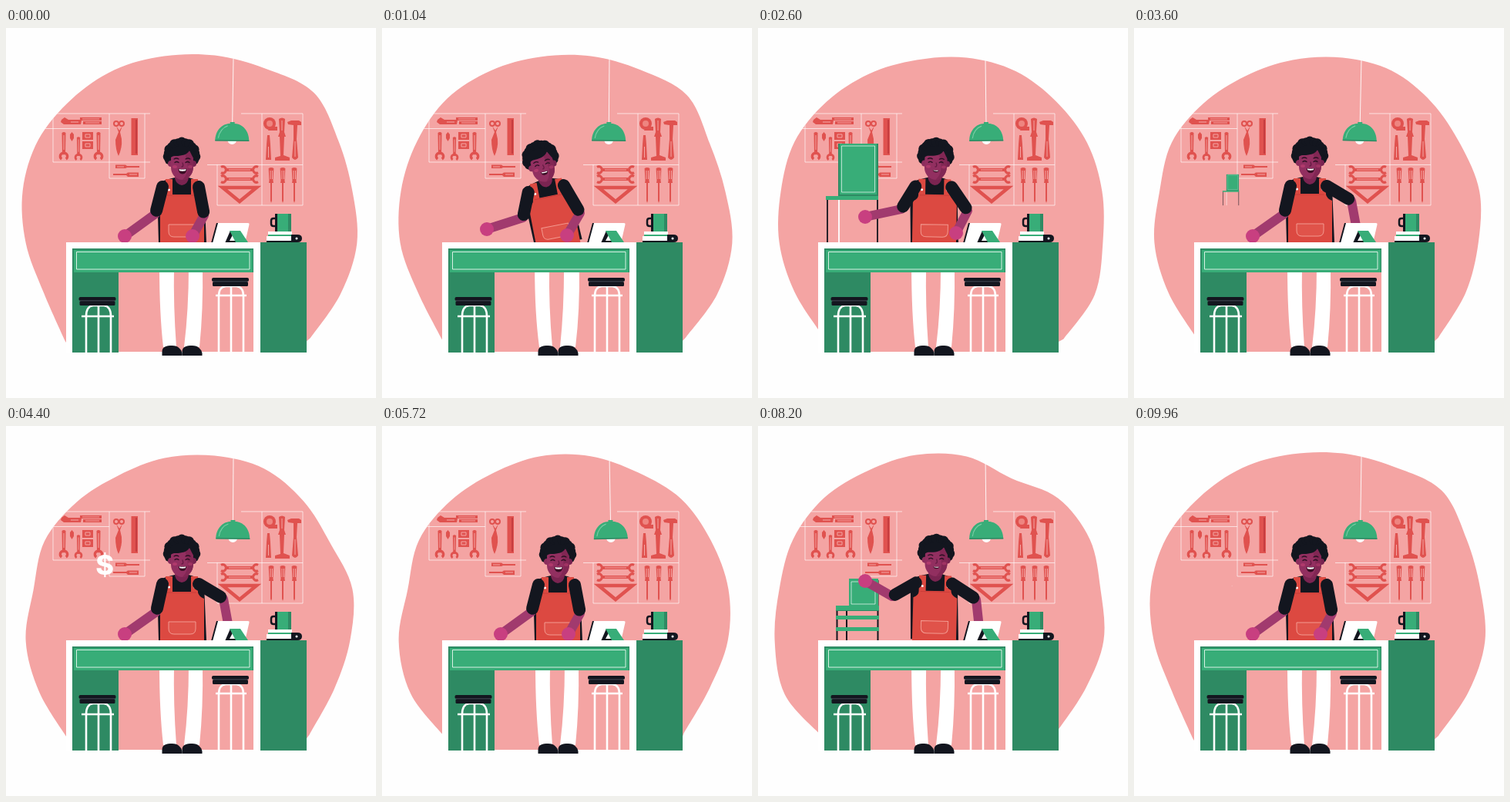
These frames come from a looping animation (480 px wide and 480 px high, 10 s). An HTML page:

```html
<!DOCTYPE html>
<html lang="en">
<head>
<meta charset="utf-8">
<title>Workshop</title>
<style>
  html, body { margin: 0; width: 100%; height: 100%; overflow: hidden; background: #fefefe; }
  svg { display: block; width: 100vw; height: 100vh; }
  .line { fill: none; stroke: #fff; stroke-width: 1; stroke-opacity: .65; }
  .tool { fill: #e0524f; }
  .toolLine { fill: none; stroke: #e0524f; }
  .glint { fill: none; stroke: #f4a5a4; stroke-width: 1; }
  .dark { fill: #13161f; }
  .green { fill: #38ad78; }
  .deep { fill: #2e8a63; }
  .white { fill: #fff; }
  .limb { fill: none; stroke-linecap: round; stroke-linejoin: round; }
  .sleeve { stroke: #13161f; stroke-width: 16; }
  .skin { stroke: #a13a6e; stroke-width: 12; }
  .hand { fill: #c83f80; }
  #cash { font: 800 36px Inter, "Open Sans", sans-serif; text-anchor: middle; fill: #fff; }
</style>
</head>
<body>
<svg viewBox="0 0 480 480">
  <defs>
    <clipPath id="inside"><path id="blobClip"/></clipPath>
    <clipPath id="aboveDesk"><path d="M0 0H480V279H0Z"/></clipPath>
    <g id="wrench">
      <path class="tool" d="M-2.5 0Q0 -2 2.5 0L2 26H-2Z"/>
      <path class="toolLine" stroke-width="3.4" d="M-2.8 34A4.3 4.3 0 0 1 -2 26.5H2A4.3 4.3 0 0 1 2.8 34"/>
      <path class="glint" d="M0 3V22"/>
    </g>
    <g id="driver">
      <path class="tool" d="M-3.4 1Q0 -1 3.4 1L2.5 17L3 20H-3L-2.5 17ZM-1 20H1V43L0 46L-1 43Z"/>
      <path class="glint" d="M-1 4V15M1.5 4V15"/>
    </g>
    <g id="spanner">
      <path class="toolLine" stroke-width="4" d="M8 0H42"/>
      <path class="toolLine" stroke-width="3" d="M1 -3.6A4.2 4.2 0 1 1 1 3.6M49 -3.6A4.2 4.2 0 1 0 49 3.6"/>
      <path class="glint" d="M11 0H39"/>
    </g>
    <g id="seat">
      <rect class="dark" x="-24" width="48" height="5" rx="2"/>
      <rect class="dark" x="-23" y="5" width="46" height="6" rx="1.5"/>
      <path d="M-23 4.8H23" stroke="#59606b" stroke-width=".7"/>
    </g>
    <path id="shoe" class="dark" d="M0 425V420C0 413 6 412 13 412C21 412 25 417 26 422V425Z"/>
  </defs>

  <path id="blob" fill="#f4a4a3"/>

  <g clip-path="url(#inside)">
    <path class="line" d="M60 111H187M61 111V174H187M48 130.500H134M134 111V195H180V111M305 111H385V230H274V177M261 177.500H385M332 111V230"/>
    <path class="tool" d="M72 119L76 116L81 119H96V116H124V120H98L97 125H75L71 122ZM100 121H124V125H100Z"/>
    <path class="glint" d="M99 118H121M84 122H94M103 123H121"/>
    <use href="#wrench" x="75" y="136"/>
    <use href="#wrench" x="120" y="136"/>
    <use href="#wrench" transform="translate(94 142) scale(.85)"/>
    <path class="tool" d="M83 138L85.500 135L88 138V143L85.500 147L83 143ZM99 135H113V145H99ZM99 147H113V157H99Z"/>
    <path class="glint" d="M103 138H109V142H103ZM103 150H109V154H103Z"/>
    <g class="toolLine" stroke-width="2"><circle cx="143" cy="124" r="3"/><circle cx="150" cy="124" r="3"/></g>
    <path class="tool" d="M143 127L146 135L142 145Q142 158 146 166Q151 155 150 144L148 135L151 127L147 133Z"/>
    <rect class="tool" x="162.500" y="117" width="8.500" height="48"/>
    <path d="M169 119V163" stroke="#c63d40" stroke-width="2"/>
    <path class="tool" d="M142 177.500H155L157 179H173V181H157L155 182H142ZM139 189H156L158 187.500H172V193H158L156 191H139Z"/>
    <path class="glint" d="M160 190H170M144 180H153"/>

    <circle class="tool" cx="342" cy="124" r="8"/>
    <path class="tool" d="M342 128H352V133H340Z"/>
    <circle cx="342" cy="124" r="4" fill="#ee8580"/>
    <path class="tool" d="M339 139H342L343 151L344 171H337L338 151ZM354 118Q358 115 362 118L361 135L363 141H361L360 165L368 168V172H349V168L356 166L355 141H353L355 135Z"/>
    <path class="glint" d="M358 120V133M340.500 154V168"/>
    <path class="tool" d="M365 122L370 120H380L383 122V126H378L377 144L379 168Q375 174 371 168L373 144V126L366 125Z"/>
    <path class="glint" d="M375 147V167"/>
    <use href="#spanner" x="278" y="184"/>
    <use href="#spanner" x="278" y="196"/>
    <path class="toolLine" stroke-width="4.500" d="M281 207H325L303 225Z"/>
    <use href="#driver" x="344" y="181"/>
    <use href="#driver" x="359" y="181"/>
    <use href="#driver" x="374" y="181"/>
  </g>

  <g id="lamp">
    <path class="line" d="M295 40V123" style="stroke-opacity:.9"/>
    <circle class="white" cx="295" cy="145" r="6"/>
    <path class="green" d="M273 146.500C273 133 282 124 292 124V122H298V124C308 124 317 133 317 146.500Z"/>
    <path d="M277 143C278 135 283 129 289 127" fill="none" stroke="#7accA4" stroke-width="1.200"/>
    <path d="M273 146H317" stroke="#2e8a63" stroke-width="1.500"/>
  </g>

  <g clip-path="url(#aboveDesk)">
    <g id="chairA">
      <path d="M90 222V279M155 218V279" stroke="#13161f" stroke-width="1.800"/>
      <path d="M105 222V279" stroke="#fff" stroke-width="1.800"/>
      <path class="deep" d="M104 150H156V221H104Z"/>
      <path class="green" d="M106 150H154V216H106Z"/>
      <path class="line" d="M108.500 153H151.500V213H108.500Z"/>
      <path class="green" d="M88 218H156V223H88Z"/>
    </g>
    <g id="chairB">
      <path d="M102.500 236V279M115 238V279M155.500 200V279" stroke="#13161f" stroke-width="2"/>
      <path class="green" d="M118 198H156V236H118Z"/>
      <path class="line" d="M121 202H152V231H121Z"/>
      <path class="green" d="M101 233H157V239H101ZM101 246H157V251H101ZM101 261H157V266H101Z"/>
      <path d="M101 239.500H157" stroke="#2e8a63"/>
    </g>
  </g>
  <text id="cash" y="13">$</text>

  <path id="legs" class="white"/>
  <use href="#shoe" x="202.500"/><use href="#shoe" x="228.500"/>

  <g id="torso">
    <path class="dark" d="M219 194C208 197 199 198 196 207L198 279H260L257 207C255 198 246 197 237 194Z"/>
    <path d="M220 186H237V194Q236 203 228 204Q221 203 219 195Z" fill="#7b2451"/>
    <path fill="#dc4941" d="M207 196H216V216H240V196H249V217Q250 222 257 225V290H200V225Q207 222 207 217Z"/>
    <path d="M209 217H247" stroke="#c93c39"/>
    <path d="M211 255H246V264Q246 271 239 271H218Q211 271 211 264Z" fill="#e0534a" stroke="#f39a90"/>
    <circle class="white" cx="211.500" cy="210" r="1.500"/><circle class="white" cx="244.500" cy="210" r="1.500"/>
    <g id="head">
      <g id="hair" class="dark"><ellipse cx="228" cy="163" rx="20" ry="18"/></g>
      <circle cx="214" cy="176" r="4" fill="#8c2d5c"/><circle cx="243" cy="176" r="4" fill="#782350"/>
      <path d="M214 161Q228 155 243 161V180C243 190 236 197 229 197C221 197 214 190 214 181Z" fill="#922f60"/>
      <path d="M231 159L243 161V180C243 190 236 197 229 197Q238 188 235 174Z" fill="#822754"/>
      <path class="dark" d="M210 174C214 168 214 166 220 166C229 166 235 164 238 159C240 163 242 167 245 172C248 162 242 154 228 153C214 153 208 162 210 174Z"/>
      <g fill="none" stroke="#2b1022" stroke-width="1.300" stroke-linecap="round">
        <path d="M218 170Q221 168 224 170M233 170Q236 168 239 170"/>
        <path d="M219 174.500Q221.500 172.500 224 174.500M233 174.500Q235.500 172.500 238 174.500"/>
        <path d="M229 175Q231 180 228 180" stroke="#651b43"/>
      </g>
      <ellipse cx="219" cy="180" rx="3" ry="2" fill="#b03a6c"/><ellipse cx="239" cy="180" rx="3" ry="2" fill="#a03363"/>
      <g id="mouth">
        <path d="M-5.500 -3Q0 -1.500 5.500 -3Q5 4 0 4Q-5 4 -5.500 -3Z" fill="#3a0d24"/>
        <path class="white" d="M-4.500 -2.500Q0 -1.300 4.500 -2.500L4 -.3Q0 .6 -4 -.3Z"/>
      </g>
    </g>
  </g>
  <g id="arms"></g>

  <path class="dark" d="M273 253H278L271 279H266Z"/>
  <path class="white" d="M275 253H314Q316 253 315.500 255L310 279H268Z"/>
  <path class="dark" d="M291 263L297 263L290 276H299V279H284Z"/>
  <path class="green" d="M290 263H304L314 278H298Z"/>

  <path class="dark" d="M349 241H353V266H349Z"/>
  <path d="M350 247H347Q344 247 344 250V254Q344 257 347 257H350" fill="none" stroke="#13161f" stroke-width="2.500"/>
  <path class="green" d="M352 241H367V266H352Z"/><path class="deep" d="M366 241H370V266H366Z"/>
  <path class="white" d="M340 264H371V269H340ZM338 270H372V278H338Z"/>
  <path class="green" d="M340 268H371V270H340Z"/>
  <path class="dark" d="M338 276H370V268H378Q384 268 384 273Q384 278 378 278H338Z"/>
  <circle class="white" cx="377" cy="273" r="1.500"/>

  <path class="deep" d="M86 317H146V421H86ZM329 278H390V421H329Z"/>
  <path class="green" d="M86 286H322V317H86Z"/>
  <path class="deep" d="M86 286H322V288H88V317H86ZM320 288H322V317H320Z"/>
  <path d="M91.500 290.500H316V313H91.500Z" fill="none" stroke="#d8f0e4"/>
  <path class="white" d="M78 278H330V421H321V286H86V421H78Z"/>

  <g fill="none" stroke="#fff" stroke-width="2.600">
    <path d="M104 421V374Q104 361 113 360H127Q136 361 136 374V421M120 360V421M98 374H140"/>
    <path d="M276 421V348Q276 336 285 335H299Q308 336 308 348V421M292 335V421M272 347H312"/>
  </g>
  <use href="#seat" x="118.500" y="349"/><use href="#seat" x="291" y="324"/>
</svg>
<script>
const LOOP = 10000;
const $ = id => document.getElementById(id);
const set = (id, name, value) => $(id).setAttribute(name, value);
const smooth = p => p * p * (3 - 2 * p);
const ramp = (t, a, b) => smooth(Math.min(1, Math.max(0, (t - a) / (b - a))));
const mix = (a, b, p) => a.map((v, i) => v + (b[i] - v) * p);

// outline radii every 18 degrees, from lower left over the top to lower right
const blobA = [228, 213, 215, 219, 220, 216, 214, 211, 212, 216, 228, 217, 214, 220, 220, 222];
const blobKeys = [
  [0, blobA],
  [1040, [226, 215, 217, 216, 216, 217, 213, 210, 211, 214, 223, 210, 210, 219, 221, 221]],
  [2600, [218, 214, 213, 211, 214, 211, 208, 206, 209, 212, 211, 212, 211, 212, 223, 224]],
  [4400, [225, 219, 215, 205, 211, 207, 203, 206, 209, 213, 209, 205, 214, 211, 211, 220]],
  [6800, [221, 230, 222, 209, 215, 212, 209, 210, 208, 203, 215, 217, 214, 215, 209, 215]],
  [8200, [221, 228, 219, 213, 216, 215, 210, 210, 208, 199, 214, 216, 209, 213, 210, 213]],
  [LOOP, blobA]
];

// lean, drop, head turn, mouth, then left elbow and hand, right elbow and hand
const idle = [0, 0, 0, 1, 194, 241, 154, 270, 257, 243, 242, 270];
const reach = [-11, 1, -2, .65, 183, 246, 136, 261, 257, 240, 240, 269];
const deep = [-25.5, 9, 0, .4, 176, 258, 146, 284, 248, 240, 240, 270];
const show = [1, 0, 1, .4, 186, 235, 139, 245, 272, 237, 257, 266];
const rest = [0, -1, 0, .9, 195, 241, 154, 270, 282, 224, 289, 262];
const touch = [1.5, -2, 0, .4, 174, 221, 139, 201, 283, 225, 287, 262];
const poseKeys = [
  [0, idle], [450, idle], [1040, reach], [1400, deep], [1750, deep], [2300, show],
  [2900, show], [3500, rest], [4700, rest], [5200, idle], [6200, idle], [6700, deep],
  [7100, deep], [7750, touch], [8500, touch], [9150, idle], [LOOP, idle]
];

function sample(keys, t) {
  const i = keys.findIndex(k => k[0] > t);
  const [a, b] = [keys[i - 1], keys[i]];
  return mix(a[1], b[1], smooth((t - a[0]) / (b[0] - a[0])));
}

function blobPath(radii) {
  const pts = radii.map((r, i) => {
    const a = (135 + 18 * i) * Math.PI / 180;
    return [238 + r * Math.cos(a), 245 + r * Math.sin(a)];
  });
  const at = i => pts[Math.min(pts.length - 1, Math.max(0, i))];
  let d = "M" + pts[0];
  for (let i = 0; i < pts.length - 1; i++) {
    const [p, q, r, s] = [at(i - 1), at(i), at(i + 1), at(i + 2)];
    const c1 = q.map((v, k) => v + (r[k] - p[k]) / 6);
    const c2 = r.map((v, k) => v - (s[k] - q[k]) / 6);
    d += `C${c1} ${c2} ${r}`;
  }
  return d + "L388 408V420H80V411Z";
}

function shoulder(x, y, lean, drop) {
  const a = lean * Math.PI / 180, dx = x - 228, dy = y - 278;
  return [228 + dx * Math.cos(a) - dy * Math.sin(a),
          278 + drop + dx * Math.sin(a) + dy * Math.cos(a)];
}

function arm(from, elbow, hand) {
  const cuff = mix(from, elbow, .88);
  return `<path class="limb skin" d="M${mix(from, elbow, .8)}L${elbow}L${hand}"/>
    <path class="limb sleeve" d="M${from}L${cuff}"/>
    <circle class="hand" cx="${hand[0]}" cy="${hand[1]}" r="9"/>`;
}

function product(id, t, rise, leave) {
  const y = 135 * (1 - ramp(t, rise, rise + 550));
  const s = 1 - ramp(t, leave, leave + 320);
  set(id, "transform", `translate(127 ${208 + y}) scale(${s}) translate(-127 -208)`);
  $(id).style.display = t < rise || s < .01 ? "none" : "";
}

function price(t) {
  const s = t < 6000
    ? ramp(t, 3720, 4080) - ramp(t, 4700, 4990)
    : ramp(t, 8860, 9200) - ramp(t, 9700, 9990);
  set("cash", "transform", `translate(${127 + s} ${208 - 28 * s}) scale(${s})`);
  $("cash").style.display = s > .005 ? "" : "none";
}

function draw(t) {
  const outline = blobPath(sample(blobKeys, t));
  set("blob", "d", outline);
  set("blobClip", "d", outline);

  const swing = 1.25 * Math.cos((t - 400) / LOOP * 6 * Math.PI);
  set("lamp", "transform", `rotate(${swing} 295 40)`);

  const [lean, drop, turn, mouth, ...j] = sample(poseKeys, t);
  set("torso", "transform", `translate(0 ${drop}) rotate(${lean} 228 278)`);
  set("head", "transform", `rotate(${turn} 228 195)`);
  set("mouth", "transform", `translate(229 185.5) scale(${.55 + .45 * mouth} ${mouth})`);
  $("arms").innerHTML =
    arm(shoulder(203, 206, lean, drop), j.slice(0, 2), j.slice(2, 4)) +
    arm(shoulder(250, 206, lean, drop), j.slice(4, 6), j.slice(6));

  const hip = lean * .08;
  set("legs", "d", `M${199 + hip} 310H${218 + hip}Q${217 + hip} 360 221 414H204Q${199 + hip} 370 ${199 + hip} 310Z
    M${237 + hip} 310H${255 - hip}Q${256 - hip} 365 251 414H231Q${237 + hip} 365 ${237 + hip} 310Z`);

  product("chairA", t, 1750, 3400);
  product("chairB", t, 7150, 8550);
  price(t);
}

// curls around the crown
for (let i = 0; i < 15; i++) {
  const a = (158 + i * 16) * Math.PI / 180;
  $("hair").insertAdjacentHTML("beforeend",
    `<circle cx="${228 + 18 * Math.cos(a)}" cy="${165 + 17 * Math.sin(a)}" r="${5.4 + i % 2}"/>`);
}

function tick() {
  draw(performance.now() % LOOP);
  requestAnimationFrame(tick);
}
tick();
</script>
</body>
</html>
```
